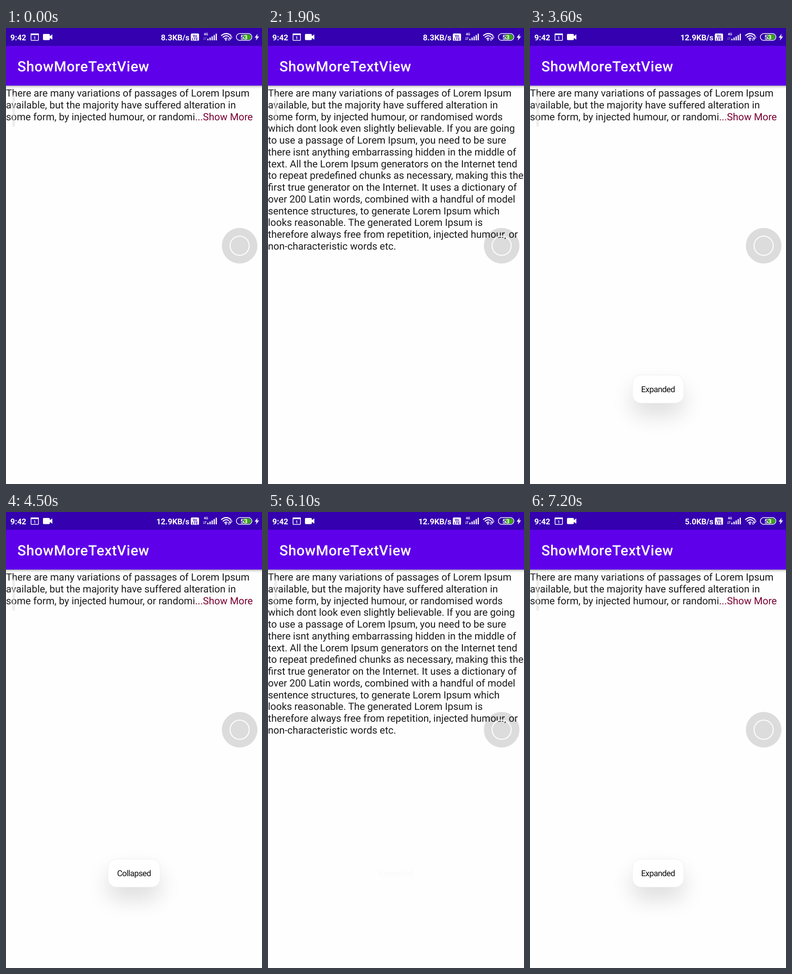
These frames come from a looping animation (561x998 px, 7400 ms). An HTML page:

```html
<!DOCTYPE html>
<html lang="en">
<head>
<meta charset="utf-8">
<title>ShowMoreTextView</title>
<style>
  html, body { margin: 0; width: 100%; height: 100%; overflow: hidden; background: #fdfefd; }
  svg { display: block; width: 561px; height: 998px; font-family: Roboto, sans-serif; text-rendering: geometricPrecision; }

  .status { font-size: 17.4px; font-weight: 700; }
  .title { font-size: 31.2px; font-weight: 500; letter-spacing: .7px; }
  .body { font-size: 21.8px; fill: #1b1b1b; }
  .link { fill: #7a0033; }
  .toast text { font-size: 18px; letter-spacing: -.6px; fill: #0c0c0c; text-anchor: middle; }
  .card { fill: #fff; stroke: #ededed; }
  .shade { fill: #000; opacity: .13; filter: url(#soft); }

  .short, .full, .speed, .arrows { animation: 7.4s step-end infinite; }
  .short { animation-name: short; }
  .full { animation-name: full; }
  .arrows { animation-name: arrows; }
  .speed { text-anchor: end; }
  .first { animation-name: first; }
  .second { animation-name: second; }
  .third { animation-name: third; }
  .toast { animation: 7.4s linear infinite; }
  .expanded { animation-name: expanded; }
  .collapsed { animation-name: collapsed; }

  @keyframes short {
    0%, 45.94%, 95.94%, 100% { opacity: 1; }
    25.67%, 72.97% { opacity: 0; }
  }
  @keyframes full {
    0%, 45.94%, 95.94%, 100% { opacity: 0; }
    25.67%, 72.97% { opacity: 1; }
  }
  @keyframes arrows {
    0%, 45.94% { opacity: .4; }
    25.67%, 60.8%, 100% { opacity: .9; }
  }
  @keyframes first { 0% { opacity: 1; } 36.48%, 100% { opacity: 0; } }
  @keyframes second { 0%, 90.53%, 100% { opacity: 0; } 36.48% { opacity: 1; } }
  @keyframes third { 0% { opacity: 0; } 90.53%, 100% { opacity: 1; } }
  @keyframes expanded {
    0%, 27%, 55.4%, 82.4% { opacity: 0; }
    31.1%, 53.4%, 85.1%, 100% { opacity: 1; }
  }
  @keyframes collapsed {
    0%, 55.4%, 82.4%, 100% { opacity: 0; }
    58.1%, 80.4% { opacity: 1; }
  }
</style>
</head>
<body>
<svg viewBox="0 0 561 998">
  <defs>
    <linearGradient id="drop" x2="0" y2="1">
      <stop offset="0" stop-color="#000" stop-opacity=".32"/>
      <stop offset=".4" stop-color="#000" stop-opacity=".1"/>
      <stop offset="1" stop-color="#000" stop-opacity="0"/>
    </linearGradient>
    <filter id="soft" filterUnits="userSpaceOnUse" x="174" y="733" width="213" height="167">
      <feGaussianBlur stdDeviation="24"/>
    </filter>
  </defs>

  <rect width="561" height="998" fill="#fdfefd"/>
  <rect y="126" width="561" height="7" fill="url(#drop)"/>
  <rect y="38" width="561" height="88" fill="#5f00ea"/>
  <rect width="561" height="39" fill="#3400b0"/>
  <text class="title" x="25" y="95" fill="#fff">ShowMoreTextView</text>

  <!-- status bar -->
  <g class="status" fill="#fff">
    <text x="9.5" y="26.5">9:42</text>
    <text class="speed first" x="402" y="26.5">8.3KB/s</text>
    <text class="speed second" x="402" y="26.5">12.9KB/s</text>
    <text class="speed third" x="402" y="26.5">5.0KB/s</text>

    <rect x="54.8" y="12.8" width="16.4" height="14.4" rx="1.5" fill="none" stroke="#fff" stroke-width="1.6"/>
    <rect x="54" y="12" width="18" height="3.5" rx="1"/>
    <text x="63" y="25" font-size="9.5" text-anchor="middle">1</text>

    <rect x="81" y="13" width="15" height="13.5" rx="2"/>
    <path d="M95 18.5L101.5 14V25.5L95 21Z"/>

    <rect x="405" y="12" width="18" height="16" rx="2.5"/>
    <g fill="#3400b0" font-size="8" text-anchor="middle">
      <text x="414" y="19.5">Vo</text>
      <text x="414" y="26.5">LTE</text>
    </g>

    <text x="433.5" y="16" font-size="7.5">4G</text>
    <path class="arrows" d="M434 20V26M432.5 24.3L434 26L435.5 24.3M437.5 26V20M436 21.7L437.5 20L439 21.7" fill="none" stroke="#fff"/>
    <path d="M442.5 27V23.5M447.2 27V21M451.8 27V18.5M456.3 27V15.5M460.8 27V12.5" stroke="#fff" stroke-width="2.6"/>

    <g fill="none" stroke="#fff" stroke-width="2.2">
      <path d="M471.5 17Q482.5 7.5 493.5 17"/>
      <path d="M475 20.5Q482.5 14 489 19.5"/>
      <path d="M478.5 24Q482 20.8 485 23"/>
    </g>
    <circle cx="482" cy="26" r="1.8"/>
    <g fill="none" stroke="#fff" stroke-width="1.2">
      <rect x="486.5" y="22.5" width="6" height="3.4" rx="1.7" transform="rotate(-45 489.5 24.2)"/>
      <rect x="489.5" y="19.5" width="6" height="3.4" rx="1.7" transform="rotate(-45 492.5 21.2)"/>
    </g>

    <path d="M520 14H531.5A5.8 5.8 0 0 1 531.5 25.6H520Z" fill="#35a413"/>
    <rect x="504.8" y="12.3" width="34" height="14.8" rx="7.4" fill="none" stroke="#fff" stroke-width="1.5"/>
    <text x="521.5" y="24.7" font-size="13.5" text-anchor="middle">53</text>
    <path d="M551.5 12.5L545 21H549L547.5 27.5L554.5 18.5H550.2Z"/>
  </g>

  <!-- paragraph -->
  <text class="body" y="150">
    <tspan x="0">There are many variations of passages of Lorem Ipsum</tspan>
    <tspan x="0" dy="25.77">available, but the majority have suffered alteration in</tspan>
  </text>
  <text class="body short" x="0" y="201.5">some form, by injected humour, or randomi<tspan class="link">...Show More</tspan></text>
  <text class="body full" y="201.5">
    <tspan x="0">some form, by injected humour, or randomised words</tspan>
    <tspan x="0" dy="25.77">which dont look even slightly believable. If you are going</tspan>
    <tspan x="0" dy="25.77">to use a passage of Lorem Ipsum, you need to be sure</tspan>
    <tspan x="0" dy="25.77">there isnt anything embarrassing hidden in the middle of</tspan>
    <tspan x="0" dy="25.77">text. All the Lorem Ipsum generators on the Internet tend</tspan>
    <tspan x="0" dy="25.77">to repeat predefined chunks as necessary, making this the</tspan>
    <tspan x="0" dy="25.77">first true generator on the Internet. It uses a dictionary of</tspan>
    <tspan x="0" dy="25.77">over 200 Latin words, combined with a handful of model</tspan>
    <tspan x="0" dy="25.77">sentence structures, to generate Lorem Ipsum which</tspan>
    <tspan x="0" dy="25.77">looks reasonable. The generated Lorem Ipsum is</tspan>
    <tspan x="0" dy="25.77">therefore always free from repetition, injected humour, or</tspan>
    <tspan x="0" dy="25.77">non-characteristic words etc.</tspan>
  </text>

  <!-- edge handle and floating button -->
  <rect x="14" y="146" width="5.5" height="70" rx="2.5" fill="#dedede" opacity=".55"/>
  <circle cx="512" cy="476.5" r="39" opacity=".135"/>
  <circle cx="512" cy="476.5" r="21" fill="none" stroke="#fafafa" stroke-width="2.4"/>

  <g class="toast expanded">
    <rect class="shade" x="224" y="785" width="113" height="62" rx="20"/>
    <rect class="card" x="224.5" y="759.5" width="112.5" height="61.5" rx="19"/>
    <text x="280.5" y="797">Expanded</text>
  </g>
  <g class="toast collapsed">
    <rect class="shade" x="223" y="785" width="115" height="62" rx="20"/>
    <rect class="card" x="223.5" y="759.5" width="114.5" height="61.5" rx="19"/>
    <text x="280.5" y="797">Collapsed</text>
  </g>
</svg>
</body>
</html>
```
